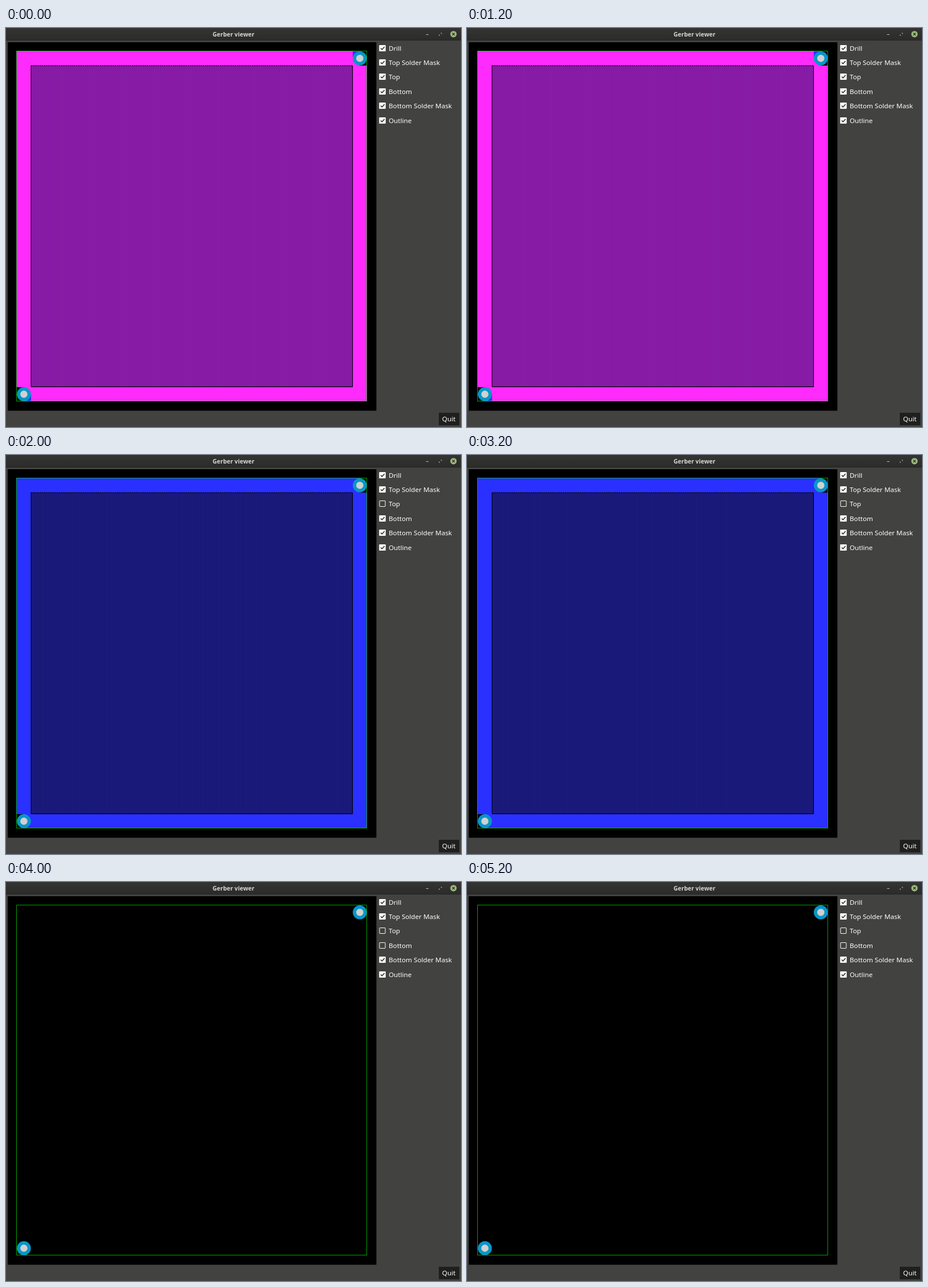
Recreate the animation shown at these times as an HTML page. Size 799x701 px, loop 6 s.

```html
<!DOCTYPE html>
<html lang="en">
<head>
<meta charset="utf-8">
<title>Gerber viewer</title>
<style>
html, body { margin: 0; width: 100%; height: 100%; overflow: hidden; background: #424240; }
svg { display: block; }
text { font: 11.67px "Noto Sans", "Open Sans", sans-serif; fill: #fff; }
.title { font-size: 10.4px; font-weight: 700; fill: #d6d6d4; }
</style>
</head>
<body>
<svg width="799" height="701" viewBox="0 0 799 701">
  <defs>
    <linearGradient id="bar" x2="0" y2="1">
      <stop stop-color="#343433"/><stop offset="1" stop-color="#2b2b2a"/>
    </linearGradient>
  </defs>
  <rect width="799" height="701" fill="#424240"/>
  <rect width="799" height="22" fill="url(#bar)"/>
  <rect y="21" width="799" height="1" fill="#262625"/>
  <text class="title" x="399.5" y="15" text-anchor="middle">Gerber viewer</text>
  <path d="M737.5 11.5h4.5M763.5 9h1.5v1.5M760.5 11.5v1.5h1.5" fill="none" stroke="#b8b8b6"/>
  <circle cx="785.8" cy="10.8" r="5.6" fill="#9cb87c"/>
  <path d="M783.7 8.7l4.2 4.2m0-4.2l-4.2 4.2" stroke="#2b2b2a" stroke-width="1.3"/>
  <rect x="3" y="25" width="647.4" height="647.4" fill="#000"/>
  <g id="both"></g>
  <g id="bottom"></g>
  <rect x="18.5" y="40.5" width="615" height="615" fill="none" stroke="#0f0" stroke-opacity=".64"/>
  <g id="pads"></g>
  <g id="list"></g>
  <rect x="760" y="676" width="36" height="22" fill="#1f1f1e"/>
  <text x="777.6" y="691" text-anchor="middle">Quit</text>
</svg>
<script>
const $ = id => document.getElementById(id);
const LEFT = 44, TOP = 66, SIZE = 565, LINES = 300, PITCH = SIZE / LINES;
const BLUE = '#2a30ff', PINK = '#ff2afc';

const rect = (x, y, w, h, fill) =>
  `<rect x="${x}" y="${y}" width="${w}" height="${h}" fill="${fill}"/>`;

// Fine parallel traces with gaps of the same width
function coil(gap, trace) {
  let out = rect(LEFT, TOP, SIZE, SIZE - 1, gap);
  for (let i = 0; i < LINES; i++) {
    out += rect((LEFT + (i + .5) * PITCH).toFixed(3), TOP, (PITCH / 2).toFixed(3), SIZE - 1, trace);
  }
  return out;
}

// Copper frame without the two pad corners
const frame = fill =>
  `<path d="M18.5 40.5H609V66H44V631H18.5ZM633.5 66V655.5H44V631H609V66Z" fill="${fill}"/>`;

// Turns join every second pair of traces
const edges = `<path d="M44 66.2H609M44 630.4H609" stroke="#000" stroke-width="1.2"
  stroke-dasharray="2.5 ${2 * PITCH - 2.5}"/>
  <path d="M44 66V630M608.6 66V630" stroke="#000"/>`;

// Half of each pad corner is copper; near is the part beside the coil
const corners = (outer, near) =>
  rect(609, 40.5, 12, 12.5, outer) + rect(609, 53, 12, 13, near) +
  rect(31, 643, 13, 12.5, outer) + rect(31, 631, 13, 12, near);

$('both').innerHTML = frame(PINK) + corners(BLUE, PINK) + coil('#5c1680', '#b222ca') + edges;
$('bottom').innerHTML = frame(BLUE) + corners(BLUE, BLUE) + coil('#10104c', '#2424a8') + edges;

const pad = (x, y) =>
  `<circle cx="${x}" cy="${y}" r="12.3" fill="#0896c8"/>
   <circle cx="${x}" cy="${y}" r="6.3" fill="#d0d0d0"/>`;
$('pads').innerHTML = pad(621.3, 53.2) + pad(31.4, 643.4);

const names = ['Drill', 'Top Solder Mask', 'Top', 'Bottom', 'Bottom Solder Mask', 'Outline'];
$('list').innerHTML = names.map((name, i) => {
  const y = Math.floor(36 + i * 25.4), box = y - 6;
  return `<rect x="656" y="${box + .5}" width="10" height="10" rx=".5" fill="none" stroke="#fff"/>
    <g class="tick">${rect(655.5, box, 11, 11, '#fff')}
    <path d="M658 ${box + 5.5}l2.3 2.4 4.4-4.9" fill="none" stroke="#333" stroke-width="1.6"/></g>
    <text x="672" y="${y + 4}">${name}</text>`;
}).join('');
const ticks = document.querySelectorAll('.tick');

const show = (el, on) => el.setAttribute('visibility', on ? 'visible' : 'hidden');

function draw(ms) {
  const step = Math.floor(ms % 6000 / 2000);
  const top = step === 0, bottom = step < 2;
  show($('both'), top);
  show($('bottom'), bottom && !top);
  show(ticks[2], top);
  show(ticks[3], bottom);
}

const start = performance.now();
function tick() {
  draw(performance.now() - start);
  requestAnimationFrame(tick);
}
tick();
</script>
</body>
</html>
```
